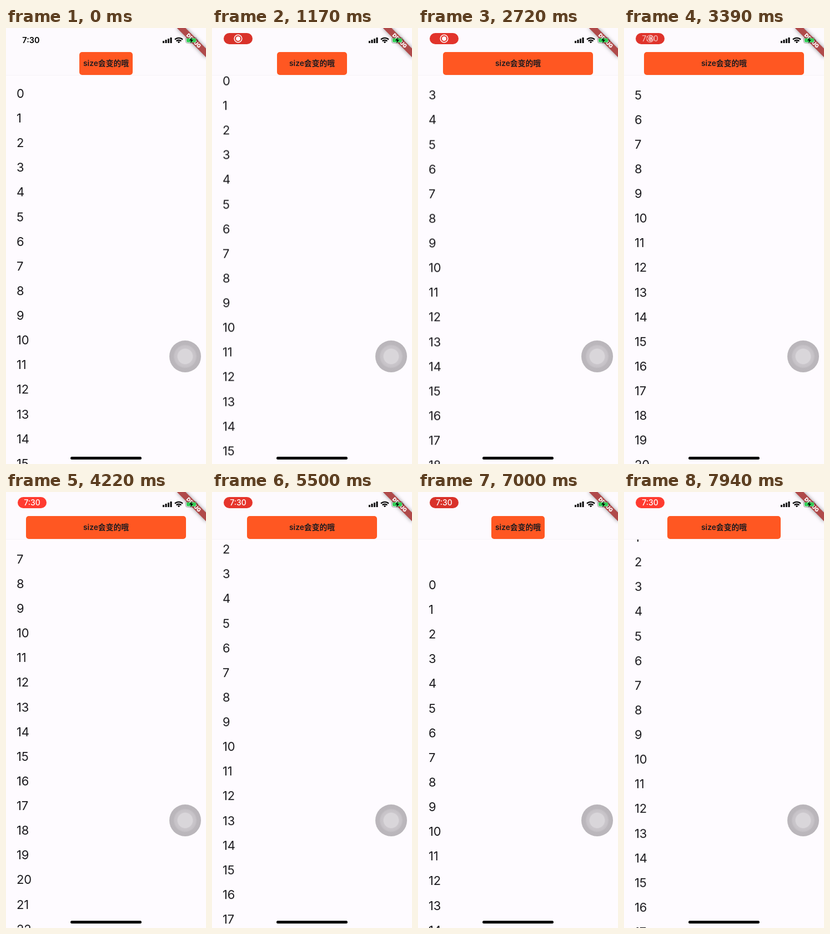
These frames come from a looping animation (360 px wide and 780 px high, 8000 ms). An HTML page:

```html
<!DOCTYPE html>
<html lang="zh">
<head>
<meta charset="utf-8">
<title>Resizing header button</title>
<style>
  html, body { margin: 0; width: 100%; height: 100%; overflow: hidden; background: #fefbff; }
  #stage { position: relative; width: 360px; height: 780px; overflow: hidden; font-family: Inter, "Noto Sans CJK SC", "Noto Sans CJK", sans-serif; color: #1c1b1f; }
  #stage > * { position: absolute; }

  #list { left: 0; top: 85px; width: 360px; height: 695px; overflow: hidden; }
  #rows { padding: 9.9px 0 0 18.9px; font-size: 22px; will-change: transform; }
  #rows div { height: 44.13px; line-height: 44.13px; }

  #header { left: 0; top: 0; width: 360px; height: 84px; background: #fdfafe; border-bottom: 1px solid #f5f2f6; }
  #button { left: 132px; top: 42.6px; width: 96px; height: 41.4px; border-radius: 5px; background: #ff5722; }
  #label { left: 0; top: 42px; width: 360px; line-height: 43px; text-align: center; font-size: 13.8px; font-weight: 600; }

  #banner {
    left: 300.5px; top: 17px; width: 73.8px; height: 11.1px; transform: rotate(45deg);
    background: #b04a4a; box-shadow: 0 0 7px rgba(0, 0, 0, .42);
    color: #fff; font-size: 9.4px; font-weight: 900; line-height: 11.1px; text-align: center;
  }
  #status { left: 0; top: 0; }

  #clock { left: 21px; width: 48px; top: 12px; line-height: 20px; text-align: center; font-size: 14.5px; font-weight: 600; color: #000; animation: leave 8s step-end infinite; }
  #pill { left: 21px; top: 8.5px; width: 52px; height: 20px; border-radius: 10px; animation: appear 8s step-end infinite, pulse 2s ease-in-out infinite; }
  #pill > * { position: absolute; inset: 0; }
  #pill span { line-height: 20px; text-align: center; font-size: 14px; font-weight: 500; color: #fff; animation: time-in 8s linear infinite; }
  #pill svg { animation: icon-out 8s linear infinite; }

  @keyframes leave { 0% { opacity: 1 } 6.5%, 100% { opacity: 0 } }
  @keyframes appear { 0% { opacity: 0 } 6.5%, 100% { opacity: 1 } }
  @keyframes pulse { 0%, 8%, 100% { background: #ff3b30 } 50%, 58% { background: #d9322a } }
  @keyframes time-in { 0%, 40.5% { opacity: 0 } 43.5%, 100% { opacity: 1 } }
  @keyframes icon-out { 0%, 41% { opacity: 1; transform: none } 44%, 100% { opacity: 0; transform: scale(.8) } }

  #touch { left: 294px; top: 559px; width: 57px; height: 57px; border-radius: 50%; background: radial-gradient(circle closest-side, #d9d6da 46%, #cac6cb 51%, #c6c2c7 67%, #bbb7bc 75%, #b9b5ba); }
  #home { left: 115.8px; top: 767.3px; width: 128.4px; height: 4.7px; border-radius: 3px; background: #000; }
</style>
</head>
<body>
<div id="stage">
  <div id="list"><div id="rows"></div></div>
  <div id="header"></div>
  <div id="button"></div>
  <div id="label">size会变的哦</div>
  <div id="banner">DEBUG</div>

  <svg id="status" width="360" height="40">
    <path d="M283.5 27v-4M288 27v-6M292.5 27v-8M297 27v-10" stroke="#000" stroke-width="3"/>
    <g fill="none" stroke="#000" stroke-width="2.2">
      <path d="M304 20.6a10 10 0 0 1 14 0M306.6 23.4a6.2 6.2 0 0 1 8.8 0"/>
    </g>
    <path d="M311 27.2l-2.2-2.3a3.1 3.1 0 0 1 4.4 0z"/>
    <rect x="323.5" y="17" width="20" height="10" rx="3" fill="none" stroke="#000" stroke-opacity=".35"/>
    <rect x="325" y="18.5" width="17" height="7" rx="1.7" fill="#32d058"/>
    <path d="M345 20.5v3" stroke="#000" stroke-opacity=".4" stroke-width="1.4"/>
    <path d="M335 16.5l-5 6h3.2l-1.4 5 5.2-6.4h-3.3z"/>
  </svg>

  <div id="clock">7:30</div>
  <div id="pill">
    <svg width="52" height="20">
      <circle cx="26" cy="10" r="6.8" fill="none" stroke="#fff" stroke-width="1.5"/>
      <circle cx="26" cy="10" r="3.9" fill="#fff"/>
    </svg>
    <span>7:30</span>
  </div>

  <div id="touch"></div>
  <div id="home"></div>
</div>

<script>
  const LOOP = 8000;
  const rows = document.getElementById('rows');
  const button = document.getElementById('button');
  rows.innerHTML = Array.from({ length: 30 }, (_, i) => `<div>${i}</div>`).join('');

  // [time in ms, scroll offset in px]
  const path = [[0, 0], [2000, 56.6], [3390, 218], [4220, 306], [5500, 103], [7000, -49], [7940, 80], [LOOP, 88]];
  const secant = i => (path[i + 1][1] - path[i][1]) / (path[i + 1][0] - path[i][0]);

  // Monotone tangents: flat at turning points and at the start
  const slopes = path.map((_, i) => {
    if (i === 0) return 0;
    if (i === path.length - 1) return secant(i - 1);
    const a = secant(i - 1), b = secant(i);
    return a * b > 0 ? 2 * a * b / (a + b) : 0;
  });

  function scrollAt(t) {
    const i = path.findIndex((p, k) => k && t <= p[0]) - 1;
    const [t0, y0] = path[i], [t1, y1] = path[i + 1];
    const h = t1 - t0, u = (t - t0) / h, v = 1 - u;
    return v * v * ((1 + 2 * u) * y0 + u * h * slopes[i])
         + u * u * ((1 + 2 * v) * y1 - v * h * slopes[i + 1]);
  }

  function draw() {
    const scroll = scrollAt(performance.now() % LOOP);
    const width = Math.min(288, Math.max(96, 96 + scroll * 1.34));
    rows.style.transform = `translateY(${-scroll}px)`;
    button.style.width = `${width}px`;
    button.style.left = `${180 - width / 2}px`;
    requestAnimationFrame(draw);
  }
  draw();
</script>
</body>
</html>
```
